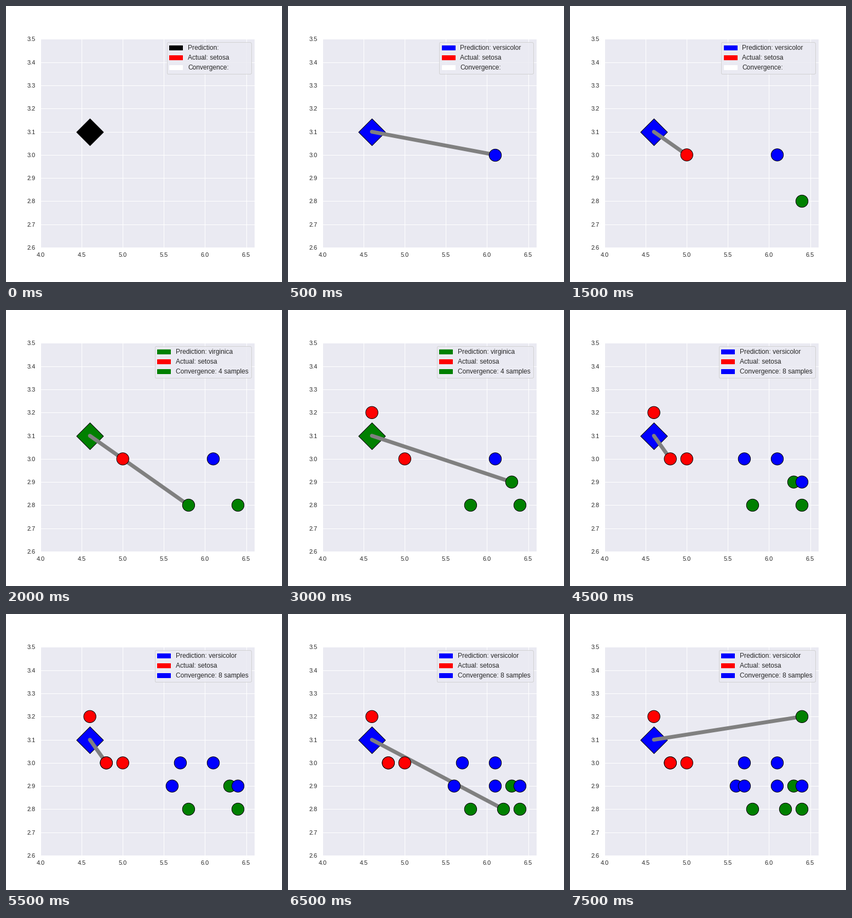
Animation, 504 px wide and 504 px high, one loop 8000 ms. Source, as a matplotlib script:

```python
import matplotlib.pyplot as plt
from matplotlib.animation import FuncAnimation
from matplotlib.patches import Patch

plt.rcParams.update({
    "font.family": "Liberation Sans",
    "axes.facecolor": "#EAEAF2",
    "axes.edgecolor": "white",
    "axes.axisbelow": True,
    "grid.color": "white",
    "grid.linewidth": 1,
    "text.color": ".15",
    "xtick.color": ".15",
    "ytick.color": ".15",
    "lines.solid_capstyle": "round",
})

COLORS = {"setosa": "red", "versicolor": "blue", "virginica": "green", "": "black"}
QUERY = (4.6, 3.1)
SAMPLES = [
    (6.1, 3.0, "versicolor"), (6.4, 2.8, "virginica"), (5.0, 3.0, "setosa"),
    (5.8, 2.8, "virginica"), (4.6, 3.2, "setosa"), (6.3, 2.9, "virginica"),
    (5.7, 3.0, "versicolor"), (6.4, 2.9, "versicolor"), (4.8, 3.0, "setosa"),
    (5.6, 2.9, "versicolor"), (4.8, 3.0, "setosa"), (6.1, 2.9, "versicolor"),
    (6.2, 2.8, "virginica"), (5.7, 2.9, "versicolor"), (6.4, 3.2, "virginica"),
]

fig, ax = plt.subplots(figsize=(7, 7), dpi=72, facecolor="white")
fig.subplots_adjust(left=0.125, right=0.9, bottom=0.125, top=0.88)


def status(n):
    """Predicted class and convergence count after n samples."""
    if n >= 8:
        return "versicolor", 8
    if n >= 4:
        return "virginica", 4
    return ("versicolor" if n else ""), None


def draw(n):
    ax.clear()
    ax.set(xlim=(4.0, 6.6), ylim=(2.6, 3.5))
    ax.grid(True)
    ax.tick_params(length=6, pad=3.5, labelsize=11, left=False, bottom=False)

    guess, count = status(n)
    color = COLORS[guess]
    ax.scatter(*QUERY, s=1200, marker="D", c=color, edgecolors="black",
               linewidths=1, zorder=1.5)
    seen = SAMPLES[:n]
    if seen:
        xs, ys, kinds = zip(*seen)
        ax.plot([QUERY[0], xs[-1]], [QUERY[1], ys[-1]], color="gray", lw=7, zorder=2)
        ax.scatter(xs, ys, s=500, c=[COLORS[k] for k in kinds],
                   edgecolors="black", linewidths=1, zorder=3)

    rows = [
        (color, f"Prediction: {guess}".ljust(27)),
        ("red", "Actual: setosa"),
        (color if count else "white",
         f"Convergence: {count} samples" if count else "Convergence:"),
    ]
    ax.legend(handles=[Patch(color=c, label=t) for c, t in rows],
              loc="upper right", fontsize=12)


anim = FuncAnimation(fig, draw, frames=len(SAMPLES) + 1, init_func=lambda: None,
                     interval=500, repeat=True, repeat_delay=0)
plt.show()
```
